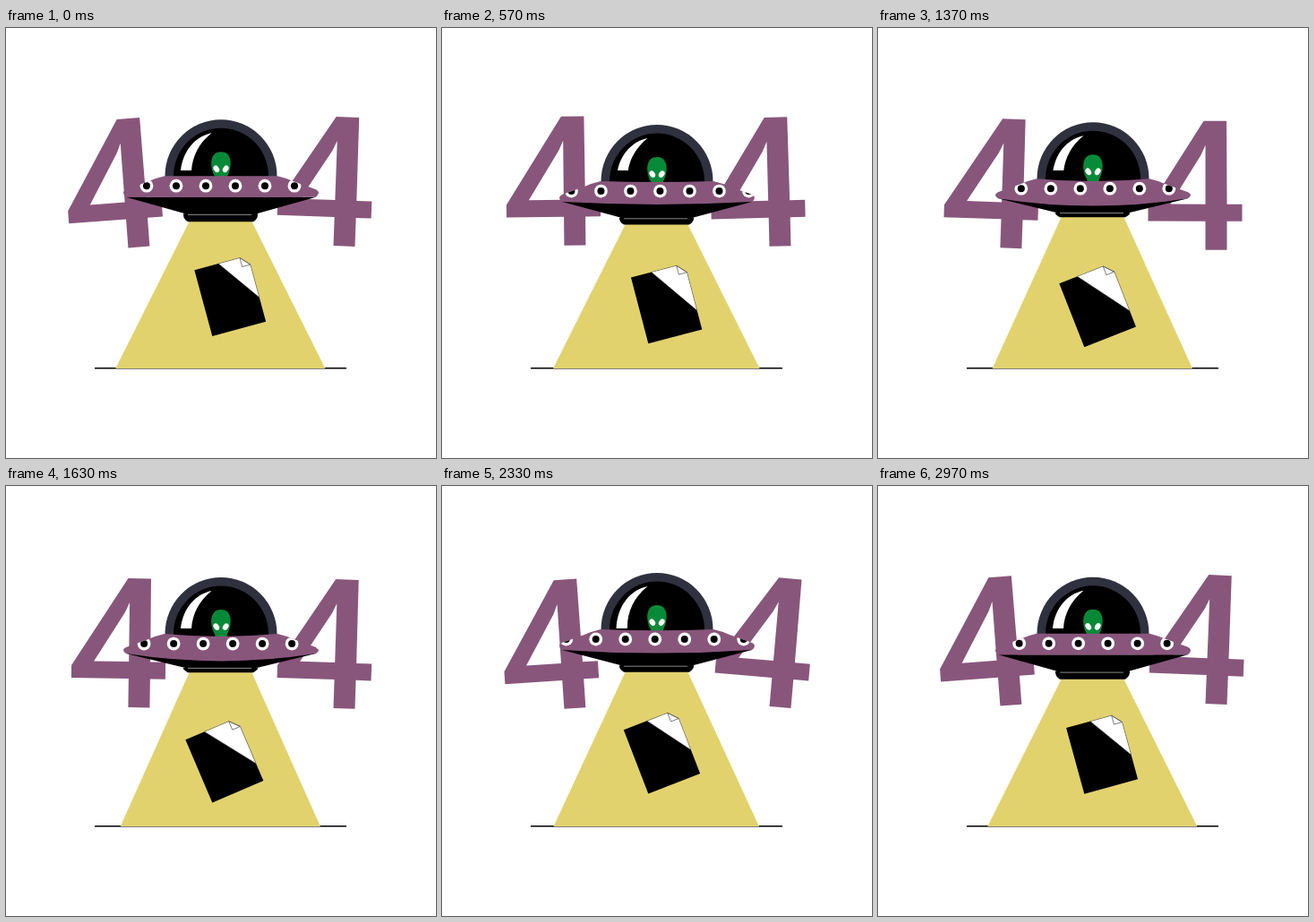
Animation of 480x480 px, one loop 3 s. Source, as an HTML page with a canvas:

```html
<!DOCTYPE html>
<html lang="en">
<head>
<meta charset="utf-8">
<title>404</title>
<style>
html, body { margin: 0; width: 100%; height: 100%; overflow: hidden; background: #fff; }
canvas { display: block; width: 480px; height: 480px; }
</style>
</head>
<body>
<canvas width="480" height="480"></canvas>
<script>
const LOOP = 3000;
const PURPLE = '#88567b', YELLOW = '#e2d26e', SLATE = '#30313e', GREEN = '#078a37';
const c = document.querySelector('canvas').getContext('2d');

// Cosine swing around mid, highest at the given time
const swing = (t, mid, amp, peak) => mid + amp * Math.cos(2 * Math.PI * (t - peak) / LOOP);

function fill(path, color) {
  c.fillStyle = color;
  c.fill(typeof path === 'string' ? new Path2D(path) : path, 'evenodd');
}

function stroke(path, color, width) {
  c.strokeStyle = color;
  c.lineWidth = width;
  c.stroke(new Path2D(path));
}

function disc(x, y, rx, ry, color, turn = 0) {
  c.beginPath();
  c.ellipse(x, y, rx, ry, turn, 0, 2 * Math.PI);
  c.fillStyle = color;
  c.fill();
}

function at(x, y, degrees, draw) {
  c.save();
  c.translate(x, y);
  c.rotate(degrees * Math.PI / 180);
  draw();
  c.restore();
}

function four() {
  fill('M-76-32V-46L-14-144H11.5L12-51H29V-32H12V0H-12V-32Z' +
       'M-12-51H-51L-17-106L-12-117Z', PURPLE);
}

function paper(lift) {
  const glareTop = 25 - 3.8 * lift, glareSide = 24 - 5.5 * lift;
  const glare = `M${glareTop}-76.300H52.5L62-66V${-glareSide}Z`;
  fill('M0 0V-76.300H52.5L62-66V0Z', '#000');
  fill(glare, '#fff');
  stroke(glare, '#444', .4);
  stroke('M52.5-76.300V-66H62Z', '#555', .7);
}

function beam(top, tilt) {
  const half = 117 - 5.5 * tilt;
  fill(`M205 ${top}H274L${239.3 + half} 380H${239.3 - half}Z`, YELLOW);
}

// Drawn with y = 0 at the row of lights; tilt runs from 0 to 1
function saucer(t, y, tilt) {
  const neck = 31 - 4 * tilt, base = 40 - 8 * tilt, rim = 12.5 - 1.5 * tilt;
  const lineY = 32.3 - 5 * tilt;

  fill('M177.5 -4V-11A62.5 63 0 0 1 302.5 -11V-4Z', SLATE);
  fill('M187 -4V-11A53 53.5 0 0 1 293 -11V-4Z', '#000');

  // The glare keeps its lower end at a fixed height
  c.save();
  c.beginPath();
  c.rect(180, -80, 60, 159 - y + 80);
  c.clip();
  fill('M229.5 -59C210 -55 195 -37 194.5 -10H207C206 -28 213 -46 229.5 -59Z', '#fff');
  c.restore();

  fill('M240-38C254-38 252-19 247-11Q246-8 246-2H234Q234-8 233-11C228-19 226-38 240-38Z', GREEN);
  disc(234.8, -18.9, 2.9, 4.1, '#fff', -.6);
  disc(245.2, -18.9, 2.9, 4.1, '#fff', .6);

  fill(`M134 ${rim}L200 ${neck}H198V${neck + 1}Q198 ${base - 3} 203 ${base}H276` +
       `Q281 ${base - 3} 281 ${neck + 1}V${neck}H280L346 ${rim}Z`, '#000');
  stroke(`M203 ${lineY}H274`, '#aaa', .8);

  const body = new Path2D(`M177 -11Q240 ${-11 + 6 * tilt} 303 -11Q312 -9 321 -5L346 4` +
    `Q352 7 346 ${rim}Q240 ${13 + 15 * tilt} 134 ${rim}Q128 7 134 4L159 -5Q168 -9 177 -11Z`);
  fill(body, PURPLE);
  c.save();
  c.clip(body);
  for (let x = 124 - 33 * (t % 1500) / 1500; x < 365; x += 33) {
    disc(x, 0, 7.4, 7.4, '#fff');
    disc(x, 0, 4, 4, '#000');
  }
  c.restore();
}

function draw(now) {
  const t = now % LOOP;
  const tilt = swing(t, .5, -.5, 0);
  const y = swing(t, 176.9, 5.9, 810);
  const lift = swing(t, 0, 1, 1140);

  c.fillStyle = '#fff';
  c.fillRect(0, 0, 480, 480);
  at(148.4, swing(t, 245.5, 2.9, 2080), swing(t, -1.4, 3.5, 1210), four);
  at(377.5, swing(t, 245.8, 2.8, 1780), swing(t, 1.5, 3.5, 2330), four);
  stroke('M99 379.75H380', '#000', 1.5);
  beam(y + 39 - 8 * tilt, tilt);
  at(230.3, 349.5 + 7.6 * lift, swing(t, -18.8, 4.7, 330), () => paper(lift));
  at(0, y, 0, () => saucer(t, y, tilt));
}

const start = performance.now();
function tick() {
  draw(performance.now() - start);
  requestAnimationFrame(tick);
}
tick();
</script>
</body>
</html>
```
